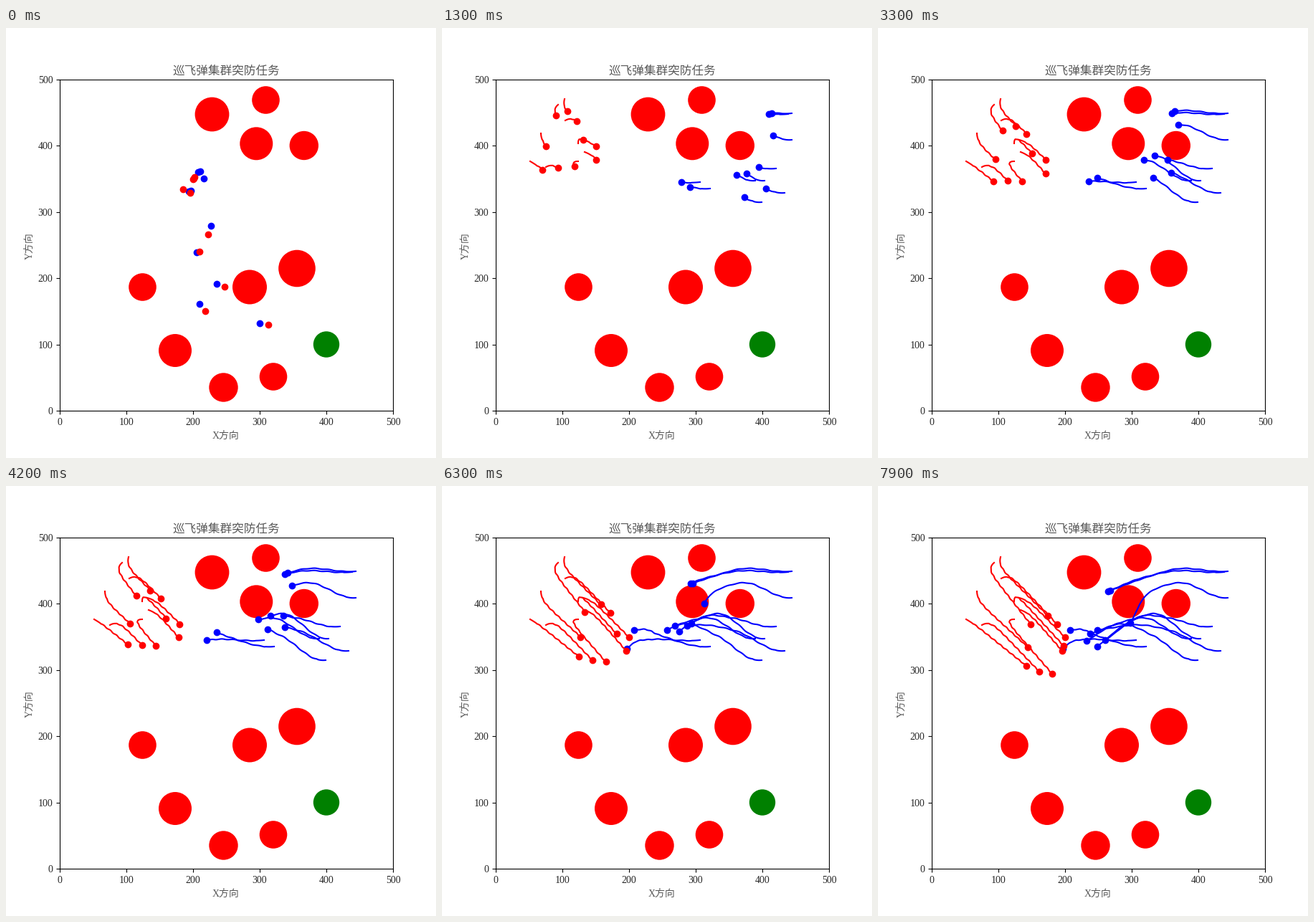
A matplotlib script for the animation above (8 s loop, 600x600 px).

```python
import numpy as np
import matplotlib.pyplot as plt
from matplotlib.animation import FuncAnimation
from matplotlib.patches import Ellipse

FRAMES, STEP = 80, 100
SX, SY = 0.93, 0.924  # pixels per axes unit
plt.rcParams["font.family"] = ["Liberation Serif", "Noto Sans CJK JP"]

fig = plt.figure(figsize=(6, 6), dpi=100, facecolor="white")
ax = fig.add_axes([0.125, 0.11, 0.775, 0.77])
ax.set(xlim=(0, 500), ylim=(0, 500))
ax.set_xticks(range(0, 501, 100))
ax.set_yticks(range(0, 501, 100))
ax.tick_params(labelcolor="0.15")


def data(px):
    """Stage pixels to axes units."""
    x, y = np.asarray(px, float).T
    return (x - 75) / SX, (534 - y) / SY


def label(x, y, text, size, rotation=0):
    fig.text(x / 600, 1 - y / 600, text, size=size, rotation=rotation, color="0.35",
             ha="center", va="baseline", rotation_mode="anchor")


def disc(x, y, r, color="red"):
    ax.add_patch(Ellipse(data((x, y)), 2 * r / SX, 2 * r / SY, color=color, lw=0))


label(307.5, 65, "巡飞弹集群突防任务", 12)
label(307, 573, "X方向", 10)
label(37, 304, "Y方向", 10, 90)

for zone in [(287.5, 120.5, 23.9), (362.5, 100.5, 19.3), (349.3, 161.3, 23),
             (415.8, 164, 20.2), (190.5, 361.5, 19.3), (340, 361.5, 24),
             (406, 335.5, 25.8), (236, 450, 23), (303.5, 501.5, 20.2),
             (373, 486.5, 19.3)]:
    disc(*zone)
disc(447, 441.5, 18.2, "green")

T = np.arange(1, FRAMES)


def weave(path, t):
    """Small sideways wobble, phased by the launch point."""
    return path + np.outer(0.5 * np.sin(0.75 * t + path[0, 0]) * (t > 6), [-0.6, 0.8])


def launch(start, heading, end, hit=79):
    """Leave along heading, ease onto a straight run and stop at end."""
    turn, start, end = 6, np.array(start), np.array(end)
    a = np.radians(heading)
    kick = 2.2 * np.array([np.cos(a), np.sin(a)])
    t = np.minimum(T, hit)
    fade = lambda u: turn * (1 - np.exp(-u / turn))
    full = fade(hit - 1)
    cruise = (end - start - kick * full) / (hit - 1 - full)
    return weave(start + np.outer(t - 1, cruise) + np.outer(fade(t - 1), kick - cruise), t)


def cruise(*points, hit=79):
    """Smooth curve through four waypoints, entered flying left."""
    p, k = np.array(points, float), np.array([1, 33, 51, hit])
    v = np.gradient(p, k, axis=0)
    v[0] = -2.2, 0.25
    t = np.minimum(T, hit)
    i = np.clip(np.searchsorted(k, t, "right") - 1, 0, 2)
    h = (k[i + 1] - k[i])[:, None]
    s = (t - k[i])[:, None] / h
    path = ((1 + 2 * s) * (1 - s) ** 2 * p[i] + s * (1 - s) ** 2 * h * v[i]
            + s * s * (3 - 2 * s) * p[i + 1] + s * s * (s - 1) * h * v[i + 1])
    return weave(path, t)


blue = [
    cruise((488, 119), (414, 116), (373, 128), (324, 146)),
    cruise((483, 120), (410, 119), (369, 128), (321, 147)),
    cruise((488, 156), (419, 135), (381, 147), (352, 191)),
    cruise((466, 196), (404, 184), (370, 181), (317, 215)),
    cruise((437, 213), (371, 184), (334, 192), (291, 216)),
    cruise((450, 213), (386, 178), (352, 189), (306, 224)),
    cruise((478, 230), (409, 202), (369, 194), (306, 201)),
    cruise((446, 243), (384, 209), (347, 193), (296, 206)),
    cruise((360, 215), (294, 214), (269, 218), (258, 227), hit=61),
    cruise((374, 224), (306, 209), (283, 200), (268, 201), hit=62),
]
red = [
    launch((171, 99), 105, (237, 181)),
    launch((162, 107), 140, (213, 193)),
    launch((172, 129), -30, (250, 193)),
    launch((190, 161), -90, (259, 223)),
    launch((197, 156), 15, (261, 211), hit=62),
    launch((199, 173), 20, (257, 230), hit=61),
    launch((138, 147), 88, (209, 225)),
    launch((123, 186), 30, (207, 251)),
    launch((145, 194), -30, (225, 259)),
    launch((190, 186), 180, (243, 262)),
]

# resting places shown before the flight begins
blue_rest = [(268, 201), (271, 200), (276, 210), (286, 276), (266, 313),
             (294, 357), (270, 385), (354, 412), (258, 227), (255, 228)]
red_rest = [(263, 208), (261, 211), (262, 210), (247, 225), (257, 230),
            (282, 288), (270, 312), (305, 361), (278, 395), (366, 414)]


class Swarm:
    def __init__(self, color, paths, rest, z):
        self.paths, self.rest = paths, rest
        self.trails = [ax.plot([], [], color=color, lw=1.5, zorder=z)[0] for _ in paths]
        self.dots, = ax.plot([], [], "o", color=color, ms=6, zorder=z + 0.5)

    def show(self, n):
        for trail, path in zip(self.trails, self.paths):
            trail.set_data(*data(path[:n]))
        self.dots.set_data(*data([p[n - 1] for p in self.paths] if n else self.rest))
        return [*self.trails, self.dots]


swarms = [Swarm("blue", blue, blue_rest, 2), Swarm("red", red, red_rest, 3)]


def update(n):
    return [artist for swarm in swarms for artist in swarm.show(n)]


anim = FuncAnimation(fig, update, frames=FRAMES, interval=STEP,
                     repeat=True, repeat_delay=0, blit=False)
plt.show()
```
